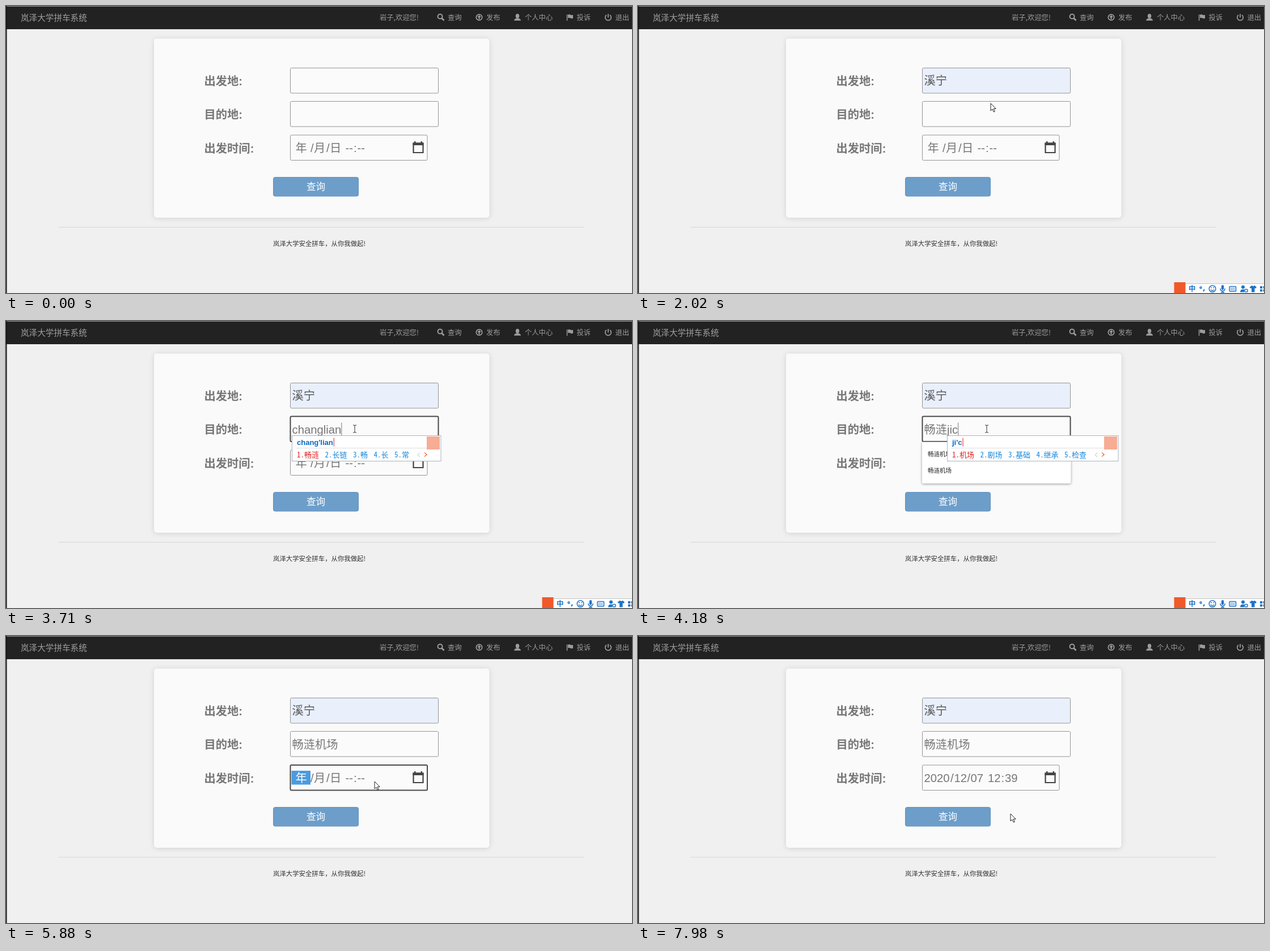
These frames come from a looping animation (1104x507 px, 8000 ms). An HTML page:

```html
<!DOCTYPE html>
<html lang="zh-CN">
<head>
<meta charset="utf-8">
<title>拼车查询</title>
<style>
html, body { margin: 0; width: 100%; height: 100%; overflow: hidden; background: #f0f0f0; }
svg { display: block; width: 1104px; height: 507px; font-family: "Noto Sans CJK SC", "Noto Sans CJK", sans-serif; }
text { white-space: pre; }
.nav { font-size: 12.3px; fill: #9d9d9d; }
.icon { fill: none; stroke: #9d9d9d; stroke-width: 2; }
.solid { fill: #9d9d9d; }
.label { font: bold 20.3px "Liberation Sans", "Noto Sans CJK SC", sans-serif; fill: #777; }
.input { font: 20.3px "Liberation Sans", "Noto Sans CJK SC", sans-serif; fill: #777; }
.box { fill: #fbfbfb; stroke: #949494; }
.box.hover { stroke: #555; }
.box.focus { stroke: #484848; stroke-width: 2; }
.box.filled { fill: #e9effb; }
.panel { fill: #fff; filter: drop-shadow(0 1px 2px rgba(0,0,0,.4)); }
.option { font-size: 10.5px; fill: #222; }
.pinyin { font: bold 13px "Liberation Sans", sans-serif; fill: #0a67c5; }
.cand { font: 13px "Noto Sans Mono CJK SC", "Noto Sans CJK SC", monospace; fill: #1686d9; }
.cand.first { fill: #e02020; }
.cell { font: 10.4px "Liberation Sans", "Noto Sans CJK SC", sans-serif; fill: #111; text-anchor: middle; }
.cell.dim { fill: #888; }
.time { font-size: 11.4px; }
.on { fill: #fff; font-weight: bold; }
.tool { fill: none; stroke: #1b73c8; stroke-width: 1.5; }
.toolfill { fill: #1b73c8; }
</style>
</head>
<body>
<svg viewBox="0 0 1104 507">
  <rect width="1104" height="507" fill="#f0f0f0"/>
  <rect width="1104" height="41" fill="#222"/>
  <rect width="1104" height="1" fill="#999"/>
  <rect width="1.5" height="507" fill="#111"/>

  <text x="26" y="26" font-size="14.6" fill="#9d9d9d">岚泽大学拼车系统</text>
  <g class="nav">
    <text x="659" y="25">岩子,欢迎您!</text>
    <text x="779" y="25">查询</text>
    <text x="847" y="25">发布</text>
    <text x="915" y="25">个人中心</text>
    <text x="1006.500" y="25">投诉</text>
    <text x="1074.500" y="25">退出</text>
  </g>
  <g class="icon">
    <circle cx="765.500" cy="18.500" r="4"/><path d="M768.500 21.500l4 4" stroke-width="2.600"/>
    <circle cx="834.500" cy="20" r="5.200" stroke-width="1.700"/><path d="M834.500 23.500v-5" stroke-width="2.200"/>
    <path d="M989.500 15v11" stroke-width="1.400"/>
    <path d="M1059 16a5.200 5.200 0 1 0 6 0M1062 14v6.500" stroke-width="1.700"/>
  </g>
  <g class="solid">
    <path d="M831 19.800l3.500-3.800 3.500 3.800z"/>
    <ellipse cx="902" cy="17.800" rx="3.200" ry="4"/><path d="M896 25.800q0-3 4.500-4.300h3q4.500 1.300 4.500 4.300z"/>
    <path d="M991 15.500q2-1.500 4.500 0t4.500 0v6q-2 1.500-4.500 0t-4.500 0z"/>
  </g>

  <rect x="261" y="57.500" width="591.500" height="316.500" rx="5" fill="#fafafa"
        style="filter:drop-shadow(0 1px 5px rgba(0,0,0,.13))"/>
  <rect x="93" y="390" width="927" height="1.500" fill="#dedede"/>
  <text x="471" y="423.500" font-size="11.4" fill="#333">岚泽大学安全拼车，从你我做起!</text>

  <g class="label">
    <text x="349.500" y="139.500">出发地:</text>
    <text x="349.500" y="199">目的地:</text>
    <text x="349.500" y="258.500">出发时间:</text>
  </g>
  <rect x="471.500" y="302.500" width="150" height="33.500" rx="3" fill="#6d9eca" stroke="#6292bf"/>
  <text x="546.500" y="325.300" font-size="16.6" fill="#fff" text-anchor="middle">查询</text>

  <rect class="box" id="box1" x="501.500" y="109.500" width="261" height="44.500" rx="2"/>
  <rect class="box" id="box2" x="501.500" y="168.500" width="261" height="44.500" rx="2"/>
  <rect class="box" id="box3" x="501.500" y="228" width="241.500" height="44.500" rx="2"/>
  <text class="input" id="from" x="504.500" y="139.300" style="fill:#555"></text>
  <text class="input" id="to" x="504.500" y="198.500"></text>
  <rect id="mark" y="238" x="503.500" height="24.500" fill="#4a9be0"/>
  <g class="input" id="date"></g>
  <path d="M718.500 242.500h17v16.500h-17z" fill="none" stroke="#444" stroke-width="2.200"/>
  <path d="M717.500 241.500h19v4.500h-19zM720 239h2.500v4h-2.500zM731.500 239h2.500v4h-2.500z" fill="#444"/>
  <rect id="caret" width="1" height="23" fill="#777"/>

  <g id="list"></g>
  <g id="ime"></g>
  <g id="picker"></g>

  <g id="toolbar">
    <rect x="955" y="490.500" width="150" height="18" fill="#fff" stroke="#c4c4c4"/>
    <rect x="945.500" y="488" width="20" height="20" fill="#f0592a"/>
    <text class="toolfill" x="971" y="504" font-size="12.5" font-weight="bold">中</text>
    <g class="tool">
      <circle cx="992.500" cy="497.500" r="1.500"/><path d="M998 500.500q1 1.500-1 3.500" stroke-width="2"/>
      <circle cx="1013" cy="499.500" r="5.800"/><path d="M1010 501q3 3.600 6 0M1011 496.500v2M1015 496.500v2"/>
      <path d="M1027 499q0 4.500 4 4.500t4-4.500M1031 503v3M1028 506h6"/>
      <rect x="1043" y="495.500" width="11.500" height="8.500" rx="1"/><path d="M1045 498.500h8M1045 501.200h8" stroke-dasharray="1.500 1"/>
      <rect x="1070" y="500.500" width="5" height="4.500" rx="1"/>
    </g>
    <g class="toolfill">
      <rect x="1028.800" y="493" width="4.400" height="8.500" rx="2.200"/>
      <circle cx="1067" cy="496.500" r="3"/><path d="M1062 505.500q0-5 5-5 2 0 2 1v4z"/>
      <path d="M1082 494h1.500q1.500 2 3 0h1.500l3 3-2 2-1.500-1v7.500h-5.500v-7.500l-1.500 1-2-2z"/>
      <path d="M1097 495h4v4h-4zm5.500 0h4v4h-4zm-5.500 5.500h4v4h-4zm5.500 0h4v4h-4z"/>
    </g>
  </g>

  <path id="arrow" d="M0 0v13l3-2.800 2.300 5 2-.9-2.200-4.900h4.100z" fill="#fff" stroke="#222" stroke-width="1"/>
  <path id="beam" d="M-3-6.500h2l1 .8 1-.8h2M0-6v12M-3 6.500h2l1-.8 1 .8h2" fill="none" stroke="#333" stroke-width="1"/>
</svg>

<script>
const LOOP = 8000, STEP = 78;
const $ = id => document.getElementById(id);
const text = (x, y, s, cls = "") => `<text x="${x}" y="${y}" class="${cls}">${s}</text>`;
const rect = (x, y, w, h, rest = "") => `<rect x="${x}" y="${y}" width="${w}" height="${h}" ${rest}/>`;
const show = (el, on) => el.style.display = on ? "" : "none";

// Each track holds [start time, value]; the latest started value applies.
const at = (track, t) => track.reduce((v, k) => k[0] <= t ? k[1] : v, track[0][1]);

const places = ["溪宁", "景澜东火车站", "望岚校区", "畅涟机场T2航站楼", "望岚", "岚泽大学望岚校区"];
const matches = ["畅涟机场T2航站楼", "畅涟机场"];
const none = null;

const focus = [[0, 0], [1240, 1], [2020, 0], [2390, 2], [5560, 3], [6430, 0]];
const fromText = [[0, ""], [1790, "溪宁"]];
const toText = [[0, ""], [2870, "c"], [3110, "ch"], [3320, "cha"], [3400, "chan"], [3480, "chang"],
  [3660, "changlia"], [3710, "changlian"], [3790, "畅涟"], [3930, "畅涟j"], [4100, "畅涟ji"],
  [4170, "畅涟jic"], [4250, "畅涟jich"], [4320, "畅涟jicha"], [4400, "畅涟jichan"],
  [4470, "畅涟jichang"], [4770, "畅涟机场"]];
const lists = [[0, none], [1480, { y: 154, items: places }], [2020, none], [2390, { y: 213.5, items: places }],
  [2950, none], [3850, { y: 213.5, items: matches }], [4770, none],
  [4850, { y: 213.5, items: matches }], [5480, none]];
const candidates = [[0, none], [3030, "才 次 从 成 出"], [3180, "称呼 出货 成会 吃 车"],
  [3320, "产能 查看 差额 茶具 岔路"], [3480, "常规 场馆 长格 唱歌 长高"], [3660, "畅涟 长链 畅 长 常"],
  [3790, none], [3930, "就 及 将 加 几"], [4100, "机场 剧场 基础 继承 检查"], [4770, none]];
const pointer = [[0, ""], [70, "arrow"], [850, ""], [920, "beam"], [1560, "arrow"], [2100, "beam"], [5240, "arrow"]];
const path = [[70, 1023, 492], [850, 690, 146], [920, 688, 142.5], [1560, 688, 142.5], [1870, 622, 172],
  [2100, 622, 172], [2310, 615, 190.5], [5160, 615, 190.5], [5480, 522, 250], [5640, 522, 250],
  [5880, 650, 257], [5970, 680, 256], [6180, 757, 250], [6250, 738, 247], [6740, 738, 247],
  [7200, 516, 363], [7280, 516, 363], [7590, 818, 290], [7760, 818, 290], [7980, 657, 314]];

function position(t) {
  const i = path.findIndex(p => p[0] > t);
  if (i < 0) return path[path.length - 1].slice(1);
  if (i === 0) return path[0].slice(1);
  const [a, x0, y0] = path[i - 1], [b, x1, y1] = path[i];
  const n = Math.max(1, Math.round((b - a) / STEP));
  const u = Math.floor((t - a) / (b - a) * n) / n;
  const e = u * u * (3 - 2 * u);
  return [x0 + (x1 - x0) * e, y0 + (y1 - y0) * e];
}

function listMarkup(list, hover) {
  if (!list) return "";
  const { y, items } = list;
  return rect(501, y, 262.5, 15 + 29.3 * items.length, 'rx="2" class="panel"') +
    (hover ? rect(501, y + 7.5, 262.5, 29.3, 'fill="#eee"') : "") +
    items.map((s, i) => text(511, y + 25.5 + 29.3 * i, s, "option")).join("");
}

function imeMarkup(words, typed) {
  if (!words) return "";
  const tail = typed.startsWith("畅涟");
  const left = tail ? 545.5 : 504.5;
  const pinyin = tail ? typed.slice(2).replace("jic", "ji'c") : typed.replace("gl", "g'l");
  let x = left + 8.5, row = "";
  words.split(" ").forEach((w, i) => {
    row += text(x, 241, `${i + 1}.${w}`, i ? "cand" : "cand first");
    x += 13 + 13 * w.length + 10.5;
  });
  const end = x - 10.5, right = end + 56;
  return rect(left, 202.5, right - left, 45, 'fill="#fff" stroke="#a9b4be"') +
    rect(left + 7, 224, right - left - 32, 1, 'fill="#ddd"') +
    rect(right - 25, 204, 23, 23, 'fill="#f7ac94"') +
    text(left + 8.5, 218.5, pinyin, "pinyin") + row +
    `<path d="M${end + 19} 233l-4 3.500 4 3.500" fill="none" stroke="#bbb"/>` +
    `<path d="M${end + 27} 232.500l4 3.500-4 3.500" fill="none" stroke="#f0703a" stroke-width="1.500"/>`;
}

function pickerMarkup() {
  let s = rect(501, 273, 273, 229, 'class="panel" style="filter:drop-shadow(0 2px 4px rgba(0,0,0,.4))"') +
    rect(677.5, 274, 1, 227, 'fill="#ccc"') +
    '<text x="510" y="296" class="cell" style="text-anchor:start;font-weight:bold">2020年12月</text>' +
    '<path d="M565 291h6l-3 3.500z" fill="#111"/>' +
    '<path d="M632 299v-12.500m-6 6l6-6 6 6M658 286.500v12.500m-6-6l6 6 6-6" fill="none" stroke="#333" stroke-width="1.200"/>' +
    '<text x="640.500" y="489.500" font-size="10.3" fill="#127cd6">今天</text>';
  [..."一二三四五六日"].forEach((d, i) => s += text(521.5 + 22.75 * i, 325.5, d, "cell"));
  s += rect(511, 357, 21, 21, 'fill="#0075ff" stroke="#111" stroke-width="2"');
  for (let i = 0; i < 42; i++) {
    const day = (i + 29) % 30 + (i ? 0 : 1);
    const n = i === 0 ? 30 : i > 31 ? i - 31 : i;
    const cls = i === 7 ? "cell on" : i === 0 || i > 31 ? "cell dim" : "cell";
    s += text(521.5 + 22.75 * (i % 7), 348.8 + 22.75 * Math.floor(i / 7), n, cls);
  }
  [[703, 12], [748, 39]].forEach(([x, first]) => {
    s += rect(x - 21.5, 285, 42.5, 29.5, 'rx="1" fill="#0075ff"');
    for (let i = 0; i < 7; i++)
      s += `<text x="${x}" y="${304 + 29.3 * i}" class="cell${i ? "" : " on"}" style="font-size:11.4px">${first + i}</text>`;
  });
  return s;
}

function dateMarkup(set, marked) {
  const parts = set
    ? [[504.5, "2020"], [551, "/"], [557.5, "12"], [580.5, "/"], [586.5, "07"], [617, "12"], [640.5, ":"], [647, "39"]]
    : [[510.5, "年"], [537, "/"], [543, "月"], [565, "/"], [571, "日"], [598.5, "--"], [613, ":"], [619.5, "--"]];
  return parts.map(([x, s], i) => text(x, 258, s, i === 0 && marked ? "on-year" : "")).join("")
    .replace('class="on-year"', 'fill="#fff"');
}

const cache = {};
function fill(id, markup) {
  if (cache[id] !== markup) $(id).innerHTML = cache[id] = markup;
}

function draw(t) {
  const f = at(focus, t), from = at(fromText, t), to = at(toText, t);
  const marked = t >= 5560 && t < 7760, dated = t >= 7280;
  [1, 2, 3].forEach(i => $("box" + i).setAttribute("class", "box" + (f === i ? " focus" : "")));
  $("box1").classList.toggle("hover", t >= 850 && t < 1240);
  $("box1").classList.toggle("filled", from !== "");
  $("box3").classList.toggle("hover", t >= 6430 && t < 7200);
  fill("from", from);
  fill("to", to);

  show($("mark"), marked);
  $("mark").setAttribute("width", dated ? 47 : 33.5);
  fill("date", dateMarkup(dated, marked));

  show($("caret"), f === 1 || f === 2);
  const field = f === 1 ? $("from") : $("to");
  $("caret").setAttribute("x", 504.5 + (field.textContent ? field.getComputedTextLength() : 0));
  $("caret").setAttribute("y", f === 1 ? 120.5 : 179.5);

  fill("list", listMarkup(at(lists, t), t >= 1790 && t < 2020));
  const words = at(candidates, t);
  fill("ime", imeMarkup(words, to));
  if (words && !$("ime").querySelector(".tick")) {
    const p = $("ime").querySelector(".pinyin");
    const x = +p.getAttribute("x") + p.getComputedTextLength() + 1;
    $("ime").insertAdjacentHTML("beforeend", rect(x, 206.5, 1, 15, 'class="tick" fill="#e02020"'));
  }
  show($("picker"), t >= 6430 && t < 7760);
  show($("toolbar"), t >= 1320 && t < 5560);

  const kind = at(pointer, t), [x, y] = position(t);
  ["arrow", "beam"].forEach(id => {
    show($(id), kind === id);
    $(id).setAttribute("transform", `translate(${x} ${y})`);
  });
}

$("picker").innerHTML = pickerMarkup();
const start = performance.now();
function tick() {
  draw((performance.now() - start) % LOOP);
  requestAnimationFrame(tick);
}
tick();
</script>
</body>
</html>
```
